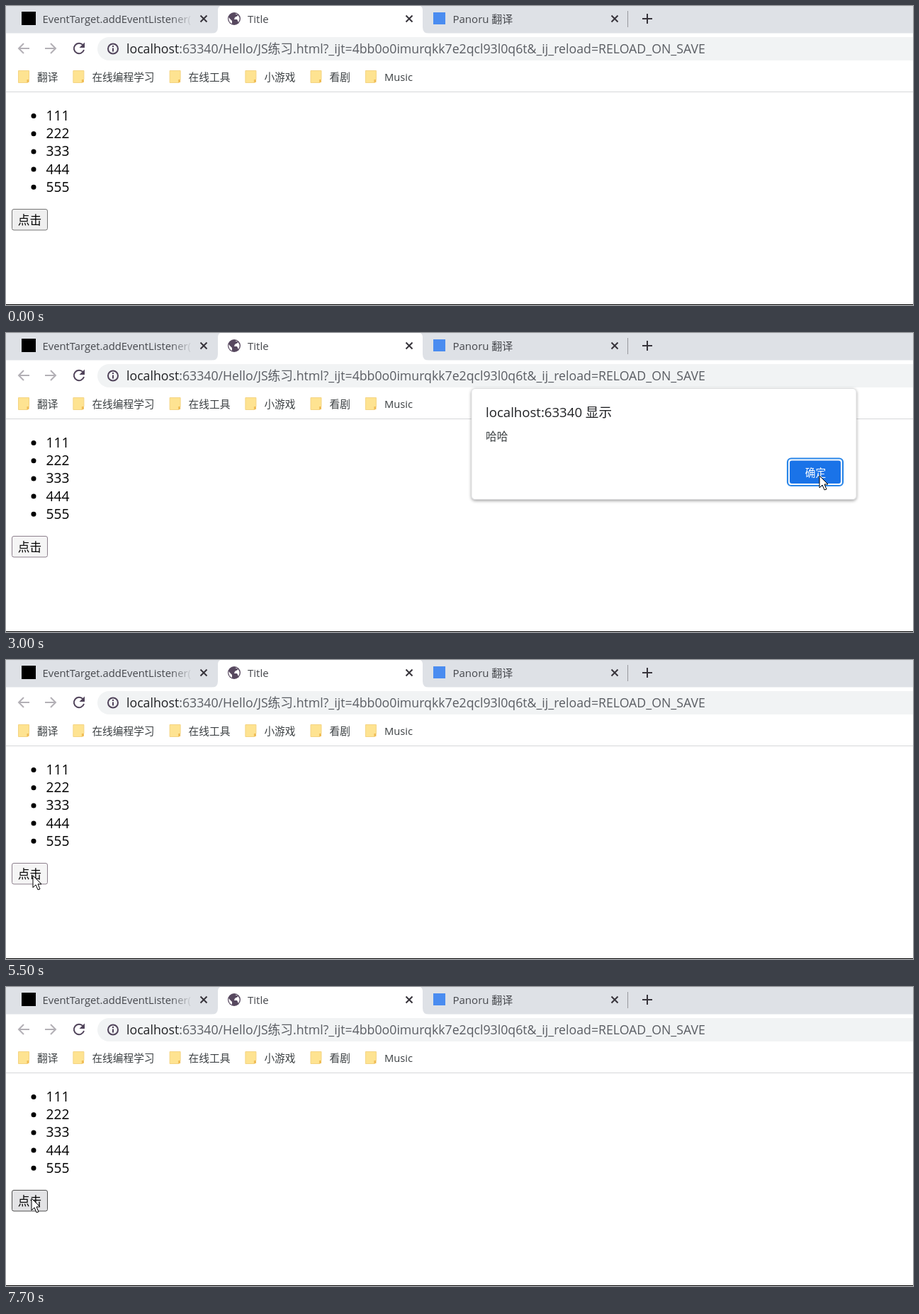
These frames come from a looping animation (1280 by 423 pixels, 8000 ms). An HTML page:

```html
<!DOCTYPE html>
<html lang="zh">
<head>
<meta charset="utf-8">
<title>Title</title>
<style>
  html, body { margin: 0; width: 100%; height: 100%; overflow: hidden; background: #fff; }
  svg { display: block; width: 1280px; height: 423px; font-family: "Open Sans", "Noto Sans CJK SC", "Noto Sans CJK", sans-serif; }
  .tab { font-size: 15px; fill: #45474c; }
  .mark { font-size: 14.7px; fill: #3c4043; }
  .list { font-size: 19.2px; }
  .line { fill: none; stroke: #50435a; stroke-width: 2; }
  .dim { stroke: #b3b0b6; }
  .close { stroke: #37343b; }
</style>
</head>
<body>
<svg viewBox="0 0 1280 423">
  <defs>
    <linearGradient id="fade" gradientUnits="userSpaceOnUse" x1="232" x2="264">
      <stop stop-color="#45474c"/><stop offset="1" stop-color="#45474c" stop-opacity="0"/>
    </linearGradient>
    <filter id="shadow" x="-5%" y="-10%" width="110%" height="125%">
      <feDropShadow dx="0" dy="1.5" stdDeviation="2" flood-opacity=".4"/>
    </filter>
    <path id="cross" class="line close" d="M-4.5-4.5l9 9m0-9l-9 9"/>
    <g id="folder">
      <path d="M.5.5h15v12l-2 5H.5z" fill="#fee391" stroke="#f4d483"/>
      <path d="M12.5 17v-4h3v4z" fill="#f0bd57"/>
    </g>
  </defs>

  <!-- tab strip -->
  <path d="M0 0h1280v38.5H0z" fill="#dee1e6"/>
  <path d="M290 39q9 0 9-9V6q0-4 3-6h283q3 2 3 6v24q0 9 9 9z" fill="#fff"/>
  <path d="M22 8h20v19H22z"/>
  <text class="tab" x="51.500" y="24" style="font-size:14.8px;fill:url(#fade)">EventTarget.addEventListener(</text>
  <g id="globe">
    <circle cx="322" cy="18" r="9" fill="#57485f"/>
    <path d="M314 16l5 5v4q-5-2-5-9zM323 11h3l1 3-4 2-1 3h4l2 4q4-7-2-11z" fill="#fff"/>
  </g>
  <path id="spinner" class="line" style="stroke:#1a73e8" d="M322 10a8 8 0 0 1 8 8"/>
  <text class="tab" x="341" y="24">Title</text>
  <path d="M603 9h17v17h-17z" fill="#4a8cf0"/>
  <text class="tab" x="630.5" y="24">Panoru 翻译</text>
  <g id="crosses"></g>
  <path d="M877.5 7v23" stroke="#97989e"/>
  <path class="line close" d="M898 18h14m-7-7v14"/>

  <!-- toolbar -->
  <path class="line dim" d="M33 60H18m7-7l-7 7 7 7M55 60h15m-7-7l7 7-7 7"/>
  <circle id="reloadHover" cx="103" cy="60" r="17" fill="#f1f3f4"/>
  <g id="reload">
    <path class="line" d="M108.500 55.200A7.200 7.200 0 1 0 110 62"/>
    <path d="M111 51.500v7.500h-7.500z" fill="#50435a"/>
  </g>
  <use id="stop" href="#cross" x="103" y="60"/>
  <rect x="129" y="44" width="1200" height="33" rx="16.5" fill="#f1f3f4"/>
  <circle class="line" cx="151" cy="60.5" r="7"/>
  <path class="line" d="M151 59.500v5m0-8.500v2"/>
  <text x="170" y="66.5" font-size="17.72" fill="#5a5d63"><tspan fill="#202124">localhost</tspan>:63340/Hello/JS练习.html?_ijt=4bb0o0imurqkk7e2qcl93l0q6t&amp;_ij_reload=RELOAD_ON_SAVE</text>
  <rect id="markHover" x="85" y="83" width="131" height="34" rx="17" fill="#f1f3f4"/>
  <g id="marks"></g>
  <path d="M0 121.5h1280" stroke="#d6d7da"/>

  <!-- page -->
  <g id="items"></g>
  <rect id="button" x="8.5" y="287.5" width="50" height="29.5" rx="2.5"/>
  <text x="16.800" y="309" font-size="16.67">点击</text>
  <path d="M0 422.5h1280" stroke="#000"/>

  <g id="dialog">
    <rect x="657" y="78.5" width="543" height="157" rx="5" fill="#fff" stroke="#c9cbce" stroke-width=".6" filter="url(#shadow)"/>
    <text x="677" y="119" font-size="18.6" fill="#202124">localhost:63340 显示</text>
    <text x="677" y="151.5" font-size="15.7" fill="#3c4043">哈哈</text>
    <rect x="1103" y="177.5" width="78" height="38.5" rx="5" fill="#fff" stroke="#2a86e8" stroke-width="2.2"/>
    <rect id="ok" x="1106" y="180.5" width="72" height="32.5" rx="3"/>
    <text x="1127.7" y="203" font-size="14.7" fill="#fff">确定</text>
  </g>
  <path id="cursor" d="M0 0v17l4-4 3 7 3-1-3-7h5z" fill="#fff" stroke="#000" stroke-linejoin="round"/>
</svg>
<script>
const $ = id => document.getElementById(id);
const show = (id, opacity) => $(id).setAttribute('opacity', +opacity);
const clamp = v => Math.min(1, Math.max(0, v));
const smooth = k => k * k * (3 - 2 * k);

$('crosses').innerHTML = [0, 1, 2].map(i => `<use href="#cross" x="${279 + 290 * i}" y="18"/>`).join('');

let left = 17;
for (const name of ['翻译', '在线编程学习', '在线工具', '小游戏', '看剧', 'Music']) {
  $('marks').innerHTML += `<use href="#folder" x="${left}" y="91"/><text class="mark" x="${left + 27}" y="105.5">${name}</text>`;
  left += 48 + 14.7 * name.length;
}

for (let n = 1; n <= 5; n++) {
  const y = 136.8 + n * 25.2;
  $('items').innerHTML += `<circle cx="39" cy="${y - 6.5}" r="3.5"/><text class="list" x="56.5" y="${y}">${n * 111}</text>`;
}

// The pointer glides to each stop in turn
const entry = { x: 68, y: 412 };
const moves = [
  { from: 200, to: 900, x: 47, y: 304 },
  { from: 1600, to: 2300, x: 1148, y: 202 },
  { from: 3100, to: 4000, x: 38, y: 305 },
  { from: 5900, to: 6600, x: 104, y: 71 },
  { from: 6900, to: 7700, x: 36, y: 299 }
];

function pointerAt(t) {
  let { x, y } = entry;
  for (const move of moves) {
    const k = smooth(clamp((t - move.from) / (move.to - move.from)));
    x += (move.x - x) * k;
    y += (move.y - y) * k;
  }
  return { x, y };
}

const looks = { normal: ['#efefef', '#767676'], hover: ['#e3e3e5', '#4f4f4f'], active: ['#f5f5f5', '#8d808d'] };

function draw(now) {
  const t = Math.floor(now % 8000 / 100) * 100;
  const during = (from, to) => t >= from && t < to;

  const { x, y } = pointerAt(t);
  show('cursor', t >= 200);
  $('cursor').setAttribute('transform', `translate(${x} ${y})`);

  const over = x > 8 && x < 59 && y > 287 && y < 317;
  const pressed = during(1200, 3300) || during(5500, 5600) || during(5800, 5900);
  const [fill, stroke] = looks[pressed ? 'active' : over ? 'hover' : 'normal'];
  $('button').setAttribute('fill', fill);
  $('button').setAttribute('stroke', stroke);

  show('dialog', Math.min(clamp((t - 1200) / 300), clamp((3300 - t) / 200)));
  $('ok').setAttribute('fill', during(3100, 3300) ? '#3b86ea' : '#1a73e8');

  const loading = during(6900, 7200);
  show('markHover', during(6400, 6700));
  show('reloadHover', during(6600, 7200) && clamp((t - 6500) / 300));
  show('reload', !loading);
  show('stop', loading);
  show('globe', !loading);
  show('spinner', loading);
  $('spinner').setAttribute('transform', `rotate(${t * .6} 322 18)`);
}

const start = performance.now();
(function loop() {
  draw(performance.now() - start);
  requestAnimationFrame(loop);
})();
</script>
</body>
</html>
```
